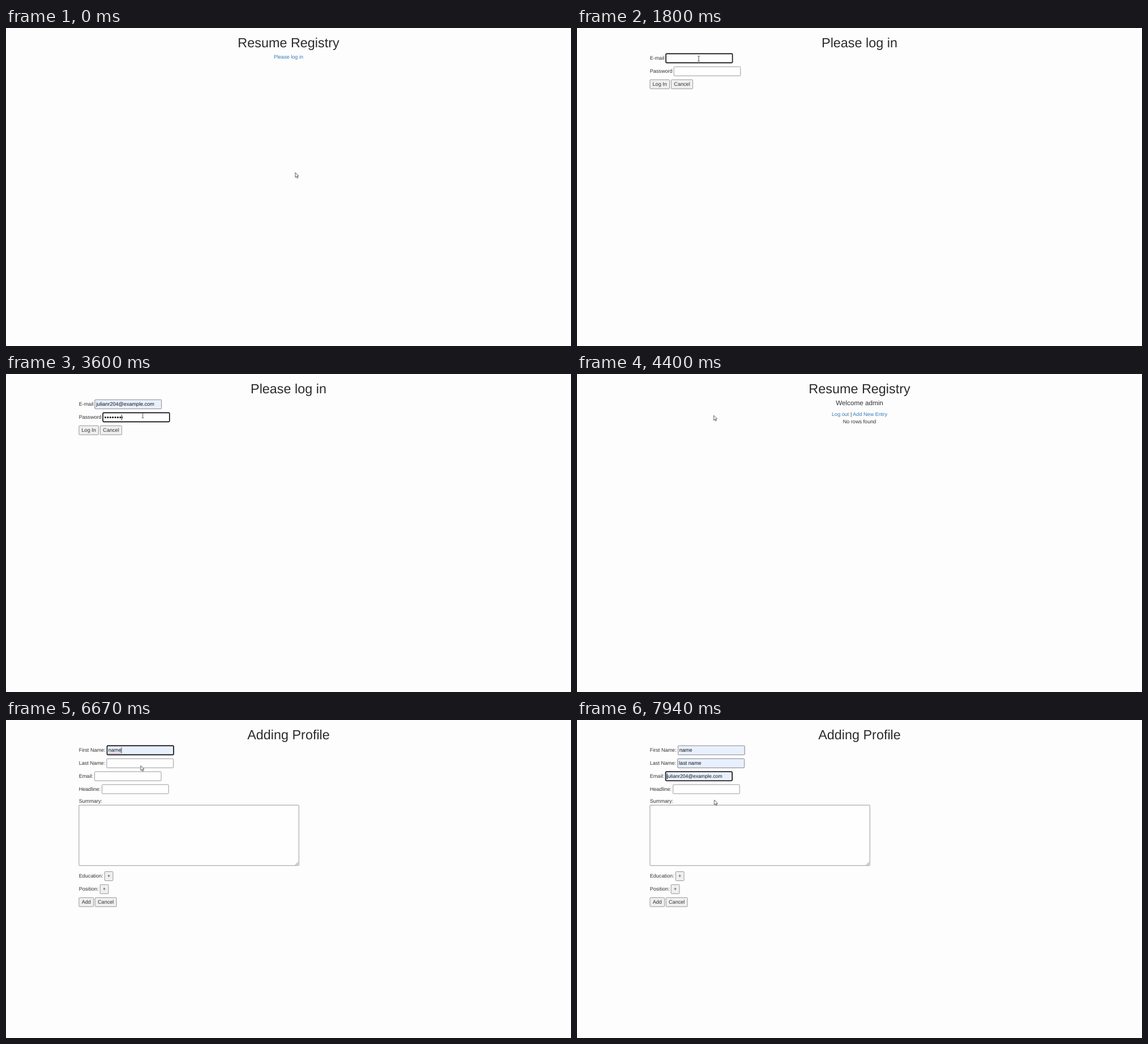
Animation of 998x561 px, one loop 8000 ms. Source, as an HTML page:

```html
<!DOCTYPE html>
<html lang="en">
<head>
<meta charset="utf-8">
<title>Resume Registry</title>
<style>
  html, body { margin: 0; width: 100%; height: 100%; overflow: hidden; background: #fdfdfd; }
  svg { display: block; width: 998px; height: 561px; }
  text { font: 9.1px "Liberation Sans", Arial, sans-serif; fill: #333; text-rendering: geometricPrecision; }
  .mid { text-anchor: middle; }
  .title { font-size: 23.4px; fill: #2b2b2b; }
  .sub { font-size: 11.7px; }
  .link { fill: #337ab7; }
  .value { fill: #111; }
  .preview { font-size: 8.67px; }
  .field rect, .buttons rect { stroke: #808088; stroke-width: .8; rx: 1.2px; }
  .field rect { fill: #fefefe; width: 117.6px; height: 16px; }
  .field .filled { fill: #e8f0fe; }
  .field .ring { fill: none; stroke: #101014; stroke-width: 1.6; rx: 1.6px; }
  .buttons rect { fill: #efefef; height: 16px; }
  .wavy { stroke: #d8384a; stroke-width: .8; stroke-dasharray: 1.4 1; }
  .caret { stroke: #111; stroke-width: .9; }

  /* Everything that appears or disappears does so in hard steps. */
  .t { animation: 8s step-end infinite; }
  .home { animation-name: home; }
  .login { animation-name: login; }
  .welcome { animation-name: welcome; }
  .form { animation-name: form; }
  .mailFocus { animation-name: mailFocus; }
  .mailFill { animation-name: mailFill; }
  .mailWavy { animation-name: mailWavy; }
  .passFocus { animation-name: passFocus; }
  .firstFocus { animation-name: firstFocus; }
  .firstFill { animation-name: firstFill; }
  .firstWavy { animation-name: firstWavy; }
  .firstCaret { animation-name: firstCaret; }
  .lastFocus { animation-name: lastFocus; }
  .lastFill { animation-name: lastFill; }
  .addressFocus { animation-name: addressFocus; }
  .addressFill { animation-name: addressFill; }
  .hoverLogin { animation-name: hoverLogin; }
  .hoverAdd { animation-name: hoverAdd; }
  .arrow { animation-name: arrow; }
  .hand { animation-name: hand; }
  .beam { animation-name: beam; }

  @keyframes home { 0% { opacity: 1 } 16.25%, 100% { opacity: 0 } }
  @keyframes login { 0% { opacity: 0 } 16.25% { opacity: 1 } 48.75%, 100% { opacity: 0 } }
  @keyframes welcome { 0% { opacity: 0 } 48.75% { opacity: 1 } 64.3%, 100% { opacity: 0 } }
  @keyframes form { 0% { opacity: 0 } 64.3%, 100% { opacity: 1 } }
  @keyframes mailFocus { 0% { opacity: 0 } 21.8% { opacity: 1 } 32.4%, 100% { opacity: 0 } }
  @keyframes mailFill { 0% { opacity: 0 } 30%, 100% { opacity: 1 } }
  @keyframes mailWavy { 0% { opacity: 0 } 30% { opacity: 1 } 32.4%, 100% { opacity: 0 } }
  @keyframes passFocus { 0% { opacity: 0 } 32.4%, 100% { opacity: 1 } }
  @keyframes firstFocus { 0% { opacity: 0 } 68.4% { opacity: 1 } 87%, 100% { opacity: 0 } }
  @keyframes firstFill { 0% { opacity: 0 } 82%, 100% { opacity: 1 } }
  @keyframes firstWavy { 0% { opacity: 0 } 82% { opacity: 1 } 87%, 100% { opacity: 0 } }
  @keyframes firstCaret { 0% { transform: none } 82%, 100% { transform: translateX(22.6px) } }
  @keyframes lastFocus { 0% { opacity: 0 } 87% { opacity: 1 } 94.5%, 100% { opacity: 0 } }
  @keyframes lastFill { 0% { opacity: 0 } 91%, 100% { opacity: 1 } }
  @keyframes addressFocus { 0% { opacity: 0 } 94.5%, 100% { opacity: 1 } }
  @keyframes addressFill { 0% { opacity: 0 } 98%, 100% { opacity: 1 } }
  @keyframes hoverLogin { 0% { fill: #337ab7 } 10.3%, 100% { fill: #23527c } }
  @keyframes hoverAdd { 0% { fill: #337ab7 } 61.5%, 100% { fill: #23527c } }
  @keyframes arrow {
    0% { opacity: 1 } 10.3% { opacity: 0 } 16.25% { opacity: 1 } 21% { opacity: 0 }
    48.75% { opacity: 1 } 61.5% { opacity: 0 } 64.3%, 100% { opacity: 1 }
  }
  @keyframes hand {
    0% { opacity: 0 } 10.3% { opacity: 1 } 16.25% { opacity: 0 }
    61.5% { opacity: 1 } 64.3%, 100% { opacity: 0 }
  }
  @keyframes beam { 0% { opacity: 0 } 21% { opacity: 1 } 48.75%, 100% { opacity: 0 } }

  /* Password typing: eight dots, caret following. */
  .dots { stroke: #111; stroke-width: 3.2; stroke-linecap: round; stroke-dasharray: 0 4.4; animation: dots 8s infinite; }
  .passCaret { animation: passCaret 8s infinite; }
  @keyframes dots {
    0%, 35% { clip-path: inset(-3px 38px -3px -3px); animation-timing-function: steps(8) }
    46%, 100% { clip-path: inset(-3px -3px -3px -3px) }
  }
  @keyframes passCaret {
    0%, 35% { transform: none; animation-timing-function: steps(8) }
    46%, 100% { transform: translateX(35.2px) }
  }

  .cursor { animation: move 8s ease-in-out infinite; }
  @keyframes move {
    0%, .5% { transform: translate(511px, 255px) }
    11.5%, 16.4% { transform: translate(510px, 54px) }
    21.5%, 23% { transform: translate(215px, 54px) }
    29.5%, 34% { transform: translate(231.5px, 84.5px) }
    44%, 57.5% { transform: translate(241.5px, 73px) }
    62%, 64.3% { transform: translate(517px, 70px) }
    68.4% { transform: translate(205px, 56px) }
    70%, 71% { transform: translate(201.5px, 67.5px) }
    81.5%, 83.8% { transform: translate(238px, 80.5px) }
    86.6%, 87.2% { transform: translate(230px, 75px) }
    90.6%, 91.4% { transform: translate(236px, 104px) }
    94.2%, 95% { transform: translate(225px, 98px) }
    98%, 100% { transform: translate(242.5px, 141px) }
  }
</style>
</head>
<body>
<svg viewBox="0 0 998 561">
  <g class="t home">
    <text class="mid title" x="499" y="34">Resume Registry</text>
    <text class="mid link t hoverLogin" x="499" y="54.4">Please log in</text>
  </g>

  <g class="t login">
    <text class="mid title" x="499" y="34">Please log in</text>
    <text x="128.7" y="56.1">E-mail</text>
    <text x="128.7" y="79">Password</text>
    <g class="field">
      <rect x="157" y="45.4"/>
      <g class="t mailFill">
        <rect class="filled" x="157" y="45.4"/>
        <text class="value" x="159.2" y="56.1">julianr204@example.com</text>
        <path class="wavy t mailWavy" d="M159.5 58.4H262"/>
      </g>
      <rect class="ring t mailFocus" x="157" y="45.4"/>
      <rect x="171.2" y="68.4"/>
      <g class="t passFocus">
        <rect class="ring" x="171.2" y="68.4"/>
        <path class="dots" d="M175.5 76.5h31" fill="none"/>
        <path class="caret passCaret" d="M173.6 71.5v10"/>
      </g>
    </g>
    <g class="buttons">
      <rect x="128.9" y="91.2" width="34.6"/>
      <text class="mid" x="146.2" y="102">Log In</text>
      <rect x="166.4" y="91.2" width="38.2"/>
      <text class="mid" x="185.5" y="102">Cancel</text>
    </g>
  </g>

  <g class="t welcome">
    <text class="mid title" x="499" y="34">Resume Registry</text>
    <text class="mid sub" x="499" y="55">Welcome admin</text>
    <text class="mid" x="499" y="73.9"><tspan class="link">Log out</tspan> | <tspan class="link t hoverAdd">Add New Entry</tspan></text>
    <text class="mid" x="499" y="86.8">No rows found</text>
  </g>

  <g class="t form">
    <text class="mid title" x="499" y="34">Adding Profile</text>
    <text x="128.7" y="56.1">First Name:</text>
    <text x="128.7" y="79">Last Name:</text>
    <text x="128.7" y="101.9">Email:</text>
    <text x="128.7" y="124.8">Headline:</text>
    <text x="128.7" y="146.1">Summary:</text>
    <text x="128.7" y="278.4">Education:</text>
    <text x="128.7" y="301.3">Position:</text>

    <g class="field">
      <rect x="178.5" y="45.4"/>
      <g class="t firstFill">
        <rect class="filled" x="178.5" y="45.4"/>
        <text class="value" x="180.7" y="56.1">name</text>
        <path class="wavy t firstWavy" d="M181 58.4H203.5"/>
      </g>
      <g class="t firstFocus">
        <rect class="ring" x="178.5" y="45.4"/>
        <path class="caret t firstCaret" d="M181.2 48.4v10"/>
      </g>

      <rect x="177.9" y="68.3"/>
      <g class="t lastFill">
        <rect class="filled" x="177.9" y="68.3"/>
        <text class="value" x="180.1" y="79">last name</text>
      </g>
      <rect class="ring t lastFocus" x="177.9" y="68.3"/>

      <rect x="156.5" y="91.2"/>
      <g class="t addressFill">
        <rect class="filled" x="156.5" y="91.2"/>
        <text class="value preview" x="158.8" y="101.9">julianr204@example.com</text>
      </g>
      <g class="t addressFocus">
        <rect class="ring" x="156.5" y="91.2"/>
        <path class="caret" d="M159 94.2v10"/>
      </g>

      <rect x="169.6" y="114"/>
    </g>

    <rect x="128.9" y="150.2" width="388.4" height="106.6" rx=".6" fill="#fefefe" stroke="#808088" stroke-width=".8"/>
    <path d="M511.4 255.8l4.6-4.6M514 255.8l2-2" stroke="#555" stroke-width=".8"/>

    <g class="buttons">
      <rect x="174.2" y="267.5" width="14.8"/>
      <text class="mid" x="181.6" y="278.4">+</text>
      <rect x="166.2" y="290.4" width="14.8"/>
      <text class="mid" x="173.6" y="301.3">+</text>
      <rect x="128.9" y="313.3" width="25.8"/>
      <text class="mid" x="141.8" y="324.2">Add</text>
      <rect x="157.3" y="313.3" width="37.8"/>
      <text class="mid" x="176.2" y="324.2">Cancel</text>
    </g>
  </g>

  <g class="cursor" stroke-linejoin="round">
    <path class="t arrow" d="M0 0V8.6L2 6.8 3.4 9.9 4.7 9.3 3.4 6.3H6Z" fill="#fff" stroke="#26262c" stroke-width=".75"/>
    <path class="t hand" d="M-1.2 8V.8Q-.3-.6.6.8V4.6Q1.8 3.8 2.4 4.9 3.5 4.2 4.1 5.3 5.6 4.9 5.6 6.4V9Q5.6 11 4.4 12.3H-.4Q-1.4 10.4-3.6 7.8-3.4 6-1.2 8Z" fill="#fff" stroke="#26262c" stroke-width=".75"/>
    <path class="t beam" d="M-1.8-4.4H-.5L0-4 .5-4.4H1.8M0-4V4M-1.8 4.4H-.5L0 4 .5 4.4H1.8" fill="none" stroke="#222" stroke-width=".8"/>
  </g>
</svg>
</body>
</html>
```
